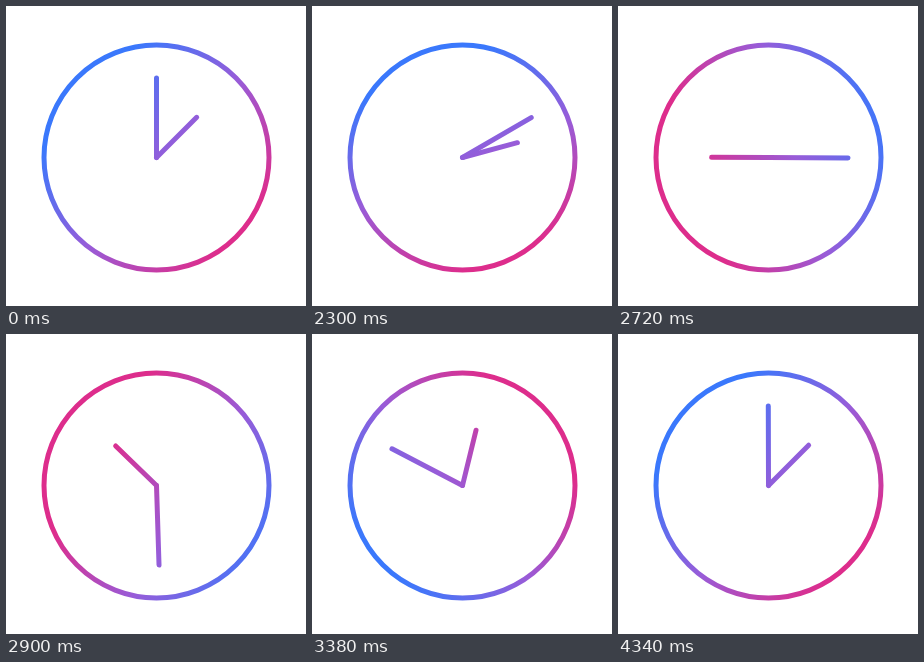
These frames come from a looping animation (300x300 px, 4.49 s). An HTML page without scripts:

```html
<!DOCTYPE html>
<html lang="en">
<head>
<meta charset="utf-8">
<title>Clock</title>
<style>
  html, body { margin: 0; width: 100%; height: 100%; overflow: hidden; background: #fff; }
  svg { display: block; width: 100vw; height: 100vh; }
  .lines { fill: none; stroke: #fff; stroke-width: 5; stroke-linecap: round; }
</style>
</head>
<body>
<svg viewBox="0 0 300 300">
  <defs>
    <!-- The gradient turns around a point slightly off the clock's centre -->
    <linearGradient id="tint" gradientUnits="userSpaceOnUse" x1="83" y1="91" x2="232" y2="224.5">
      <stop offset="0" stop-color="#3a78fc"/>
      <stop offset=".5" stop-color="#985cd8"/>
      <stop offset="1" stop-color="#dd2d8c"/>
      <animateTransform attributeName="gradientTransform" type="rotate"
        values="0 168 167; 0 168 167; 360 168 167; 360 168 167"
        keyTimes="0; .44543; .97996; 1" calcMode="spline"
        keySplines="0 0 1 1; .3 .03 .43 1; 0 0 1 1"
        dur="4.49s" repeatCount="indefinite"/>
    </linearGradient>

    <!-- Masking keeps the gradient fixed on screen while the hands turn -->
    <mask id="clock" maskUnits="userSpaceOnUse" x="0" y="0" width="300" height="300">
      <g class="lines" transform="translate(150.5 151.5)">
        <circle r="112.5"/>
        <path d="M0 0V-79.5">
          <animateTransform attributeName="transform" type="rotate"
            values="0; 0; 720; 720"
            keyTimes="0; .44543; .97996; 1" calcMode="spline"
            keySplines="0 0 1 1; .333 0 0 1; 0 0 1 1"
            dur="4.49s" repeatCount="indefinite"/>
        </path>
        <path d="M0 0L40.2 -40.2">
          <animateTransform attributeName="transform" type="rotate"
            values="0; 0; 360; 360"
            keyTimes="0; .44543; .97996; 1" calcMode="spline"
            keySplines="0 0 1 1; .333 0 0 1; 0 0 1 1"
            dur="4.49s" repeatCount="indefinite"/>
        </path>
      </g>
    </mask>
  </defs>
  <rect width="300" height="300" fill="url(#tint)" mask="url(#clock)"/>
</svg>
</body>
</html>
```
